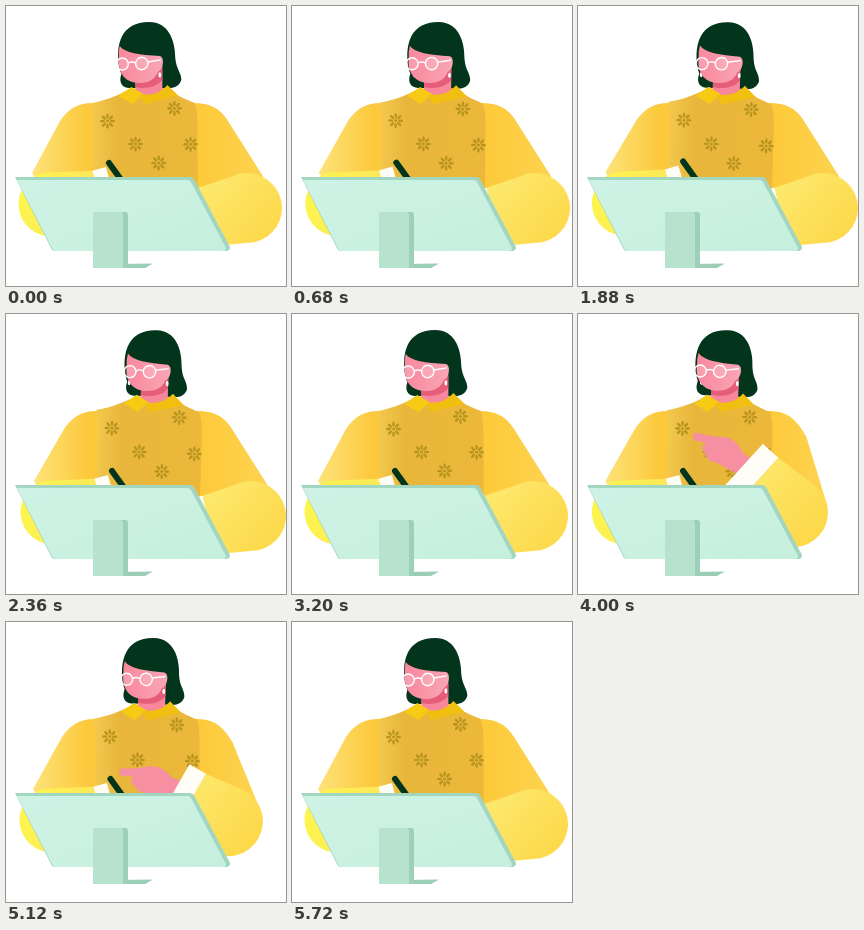
Animation, 280 px wide and 280 px high, one loop 5.76 s. Source, as an HTML page:

```html
<!DOCTYPE html>
<html lang="en">
<head>
<meta charset="utf-8">
<title>Designer at a tablet</title>
<style>
  html, body { margin: 0; width: 100%; height: 100%; overflow: hidden; background: #fff; }
  svg { display: block; width: 100vw; height: 100vh; }
</style>
</head>
<body>
<svg viewBox="0 0 280 280">
  <defs>
    <linearGradient id="upperL">
      <stop offset="0" stop-color="#fde37a"/><stop offset=".65" stop-color="#fcc93d"/>
    </linearGradient>
    <linearGradient id="upperR">
      <stop offset=".3" stop-color="#fdca3b"/><stop offset="1" stop-color="#fdd350"/>
    </linearGradient>
    <linearGradient id="foreL" y1=".3" y2=".5">
      <stop offset="0" stop-color="#fdf54e"/><stop offset="1" stop-color="#fce55c"/>
    </linearGradient>
    <linearGradient id="foreR" x2=".9" y2=".7">
      <stop offset="0" stop-color="#fdeb72"/><stop offset="1" stop-color="#fdd94c"/>
    </linearGradient>
    <linearGradient id="vest">
      <stop offset="0" stop-color="#f3c94e"/><stop offset=".25" stop-color="#e8b63b"/>
      <stop offset="1" stop-color="#ebb83a"/>
    </linearGradient>
    <linearGradient id="skin">
      <stop offset="0" stop-color="#f9889d"/><stop offset="1" stop-color="#f9a6b4"/>
    </linearGradient>
    <linearGradient id="screen" x2="1" y2="1">
      <stop offset="0" stop-color="#cef3e6"/><stop offset="1" stop-color="#c6efdd"/>
    </linearGradient>
    <g id="flower"></g>
  </defs>

  <path id="leftUpper" fill="url(#upperL)"/>
  <path id="rightUpper" fill="url(#upperR)"/>

  <g id="body">
    <path fill="url(#vest)" d="M86 97C98 95 112 90 124 83L162 81C170 90 180 93 189 97Q192 104 192 120V182H88V112Z"/>
    <g id="flowers"></g>
    <g id="head">
      <path fill="#02351c" d="M114 62C110 38 116 16 144 16C163 16 170 34 170 52C171 64 176 66 176 74C174 81 168 83 160 82H124C117 82 113 77 116 68Z"/>
      <path fill="#f7879c" d="M130 70L157 60V83C150 91 136 90 130 84Z"/>
      <path fill="#e65d7a" d="M130 74L157 62V74C150 82 138 83 130 81Z"/>
      <ellipse id="earring" cx="118" cy="69" rx="1.4" ry="2.6" fill="#fff"/>
      <g id="face">
        <path fill="url(#skin)" d="M115 46L116 40C121 47 136 49 156 50C161 51 160 63 154 66C151 74 144 77 135 77C122 77 115 68 115 56Z"/>
        <g fill="#fff" fill-opacity=".16" stroke="#fff" stroke-width="1.4">
          <circle cx="118.500" cy="58" r="6"/>
          <circle cx="138" cy="57.500" r="6.200"/>
          <path fill="none" d="M124.500 57Q128 55 132 57M144 56L157 54"/>
        </g>
        <ellipse cx="156" cy="69" rx="1.400" ry="2.600" fill="#fff"/>
      </g>
    </g>
    <path fill="#f7cb14" d="M126 81L113 90L127 98L138 88Z"/>
    <path fill="#f0bf0f" d="M162 79L173 90L139 98L134 89Q154 90 162 79Z"/>
  </g>

  <path id="leftFore" fill="url(#foreL)"/>
  <path id="leftCuff" fill="#fffef6"/>
  <g id="penHand">
    <ellipse cx="11" cy="29" rx="14" ry="7.500" fill="#f78ea2" transform="rotate(12 11 29)"/>
    <path d="M0 0L18 25" stroke="#02351c" stroke-width="6" stroke-linecap="round"/>
  </g>

  <path id="rightHand" fill="#f78fa3" d="M-8 11L6 12C14 18 23 20 30 17C37 14 45 10 55 8C60 7 59 0 54 0L43 3C46 -1 44 -6 39 -6C36 -11 29 -11 24 -9L6 -9H-8Z"/>
  <path id="rightFore" fill="url(#foreR)"/>
  <path id="rightCuff" fill="#fffef6"/>

  <path fill="#9ccdb6" d="M112 258L147 257.500L139 262H112Z"/>
  <path fill="#a3d6c0" d="M9 171H184Q187 171 189 175L224 241Q224 245 220 245H49Q46 245 45 242Z"/>
  <path fill="url(#screen)" d="M11 174H181Q184 174 185 176L220 242Q220 245 217 245H50Q47 245 46 242Z"/>
  <path fill="#9dd0b8" d="M90 206H119Q122 206 122 209V262H87V209Q87 206 90 206Z"/>
  <path fill="#b7e2cd" d="M90 206H114Q117 206 117 209V262H87V209Q87 206 90 206Z"/>
</svg>

<script>
const LOOP = 5760, STEP = 40;
const $ = id => document.getElementById(id);
const set = (id, name, value) => $(id).setAttribute(name, value);
const mix = (a, b, k) => a + (b - a) * k;

// Smooth 0 to 1 between two times.
function ramp(t, from, to) {
  const p = Math.min(1, Math.max(0, (t - from) / (to - from)));
  return p * p * (3 - 2 * p);
}
const hold = (t, start, full, leave, end) => ramp(t, start, full) - ramp(t, leave, end);
const stroke = (t, start, peak, end) => hold(t, start, peak, peak, end);

// Forearm with a round elbow and a cuff; returns the middle of the cuff's open end.
function sleeve(name, ex, ey, wx, wy, radius, half, cuff) {
  const len = Math.hypot(wx - ex, wy - ey);
  const ux = (wx - ex) / len, uy = (wy - ey) / len;
  const point = (x, y, side, along = 0) =>
    `${x - uy * side + ux * along} ${y + ux * side + uy * along}`;
  set(name + 'Fore', 'd', `M${point(wx, wy, half)}L${point(ex, ey, radius)}
    A${radius} ${radius} 0 0 1 ${point(ex, ey, -radius)}L${point(wx, wy, -half)}Z`);
  set(name + 'Cuff', 'd', `M${point(wx, wy, half)}L${point(wx, wy, half, cuff)}
    L${point(wx, wy, -half, cuff)}L${point(wx, wy, -half)}Z`);
  return [wx + ux * cuff, wy + uy * cuff];
}

function leftArm(reach, lean) {
  const ex = 45 + 2 * lean - 6 * reach, ey = 198 - 8 * reach;
  const wx = 92 + 2 * lean - 11 * reach, wy = 185 - 14 * reach;
  const shift = 4 * lean;
  sleeve('left', ex, ey, wx, wy, 32.5, 21, 14);
  set('leftUpper', 'd', `M${90 + shift} 97C${72 + shift} 96 ${62 + shift} 103 ${54 + shift} 115
    L${ex - 19} ${ey - 31}L${ex} ${ey}H110V97Z`);
  set('penHand', 'transform', `translate(${103 + 3 * lean - 8 * reach} ${157 - 15 * reach})`);
}

function rightArm(lift, lean) {
  const shift = 4 * lean;
  const ex = mix(241, 194, lift) + shift, ey = mix(202, 196, lift);
  const wx = mix(199, 163, lift) + shift, wy = mix(211, 138, lift);
  const [hx, hy] = sleeve('right', ex, ey, wx, wy, 35, mix(30, 31, lift), mix(14, 25, lift));
  const angle = mix(-62, 0, lift) * Math.PI / 180;
  const x = ex + 35 * Math.cos(angle), y = ey + 35 * Math.sin(angle);
  set('rightUpper', 'd', `M${187 + shift} 97C${204 + shift} 97 ${214 + shift} 102
    ${mix(222, 228, lift) + shift} ${mix(115, 128, lift)}L${x} ${y}L${ex} ${ey}L170 200V97Z`);
  set('rightHand', 'transform', `translate(${hx} ${hy}) rotate(${180 + 77 * lift * lift})`);
}

function draw(now) {
  const t = Math.floor(now / STEP) * STEP % LOOP;
  const lean = hold(t, 0, 1360, 2360, 3160) + hold(t, 3500, 4300, 4800, 5440);
  const reach = stroke(t, 600, 1400, 2000) + 1.4 * stroke(t, 2360, 2740, 3200)
    + .35 * stroke(t, 3300, 3600, 4000);
  const lift = hold(t, 3540, 4340, 4800, 5400);
  set('body', 'transform', `rotate(${mix(-.2, 1.55, lean)} 135 260)`);
  set('head', 'transform', `rotate(${2.5 * lift} 146 84)`);
  set('face', 'transform', `translate(${1.5 * (lean - 1)})`);
  set('earring', 'transform', `translate(${5 * (1 - lean)})`);
  leftArm(reach, lean);
  rightArm(lift, lean);
  requestAnimationFrame(draw);
}

for (let i = 0; i < 8; i++) {
  $('flower').innerHTML +=
    `<ellipse cy="-5" rx="1.3" ry="2.6" fill="#b8951f" transform="rotate(${i * 45})"/>`;
}
$('flower').innerHTML += '<circle r="1.5" fill="#b8951f"/>';
for (const [x, y] of [[102, 115], [169, 102.5], [130, 138], [185, 138.5], [153, 157]]) {
  $('flowers').innerHTML += `<use href="#flower" x="${x}" y="${y}"/>`;
}
draw(performance.now());
</script>
</body>
</html>
```
